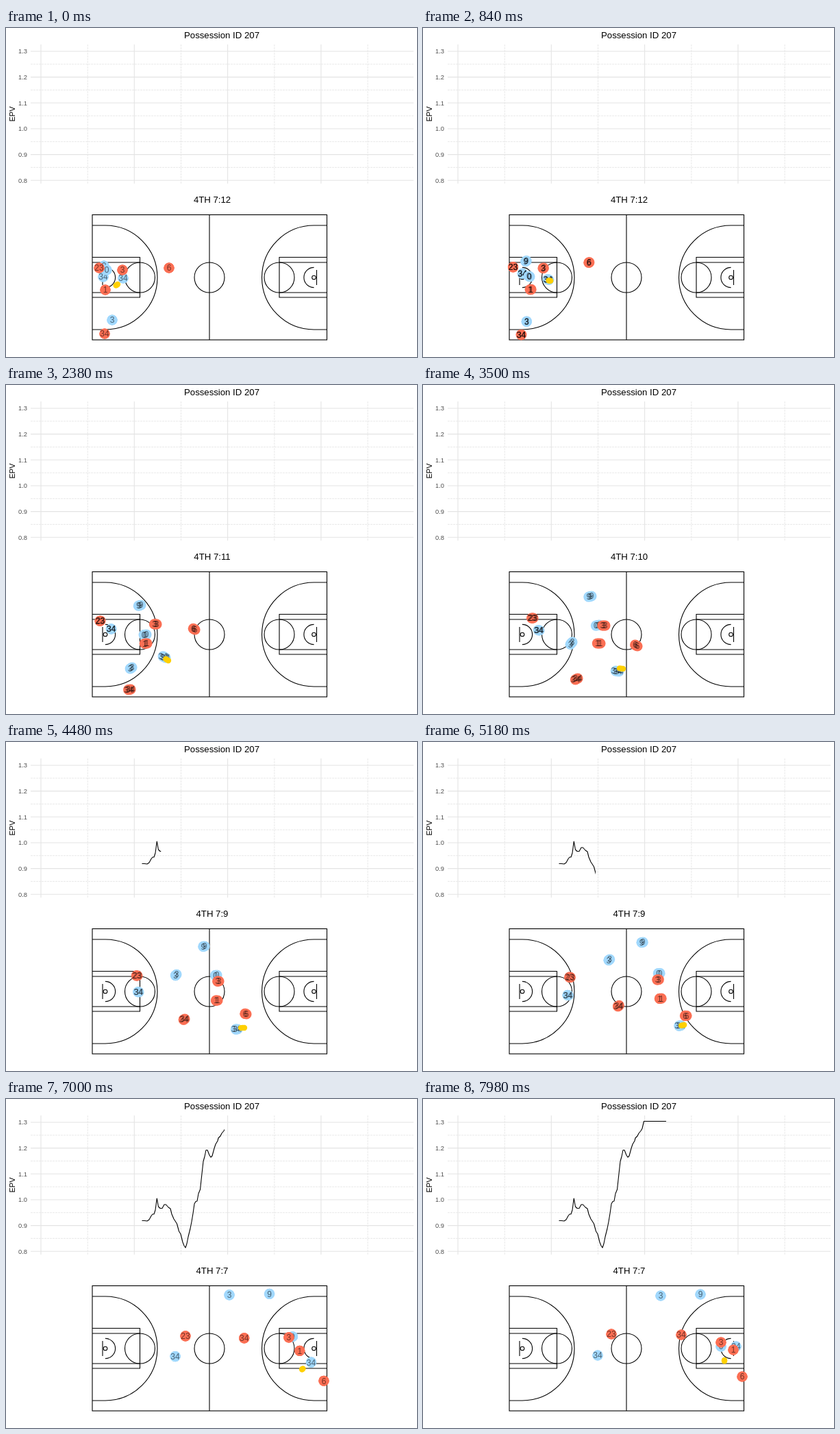
Write an HTML page that moves like this. It is 600 px wide and 480 px high and loops after 8 s.

```html
<!DOCTYPE html>
<html lang="en">
<head>
<meta charset="utf-8">
<title>Possession chart</title>
<style>
html, body { margin: 0; width: 600px; height: 480px; overflow: hidden; background: #fff; }
svg { position: absolute; left: 0; top: 0; }
text { font-family: "Liberation Sans", Arial, sans-serif; }
.title { font-size: 13.2px; text-anchor: middle; }
.tick { font-size: 9.3px; fill: #4d4d4d; text-anchor: end; }
.grid { stroke: #e4e4e4; stroke-width: 1.1; }
.minor { stroke: #e4e4e4; stroke-width: 0.8; stroke-dasharray: 3 1; }
.line { fill: none; stroke: #000; stroke-width: 1.1; }
.num { font-size: 12px; text-anchor: middle; fill: #000; fill-opacity: 0.55; }
</style>
</head>
<body>
<svg width="600" height="480" viewBox="0 0 600 480">
  <defs>
    <clipPath id="reveal"><rect id="window" width="0" height="240"/></clipPath>
    <g id="half" class="line">
      <path d="M126 334.5H195.5V393H126M126 342H195.5M126 386H195.5"/>
      <circle cx="195.5" cy="364" r="22"/>
      <circle cx="145" cy="364" r="2.8"/>
      <path d="M141 353V375M145 349.4A14.6 14.6 0 0 1 145 378.6"/>
      <path d="M126 288H145A76 76 0 0 1 145 440H126"/>
    </g>
  </defs>
  <g id="axes"></g>
  <text class="title" x="315" y="15">Possession ID 207</text>
  <text transform="translate(13 125.5) rotate(-90)" font-size="11" text-anchor="middle">EPV</text>
  <path class="line" clip-path="url(#reveal)" stroke-linejoin="round" d="M198.5 177.5L202 177.5 206 178 209 176 212 170.5 214 168 216 168 218 162 220.3 145 222.5 157 225 159.5 228 159.5 231 154 233.5 154 237 158 240 160 242 168 245 175 247 178 249.5 182 252.5 193 255 197 258 209 260 214 262 217 264 211 266 201 269 189 271 179 273 167 275 153 277 149.5 279 149 281 138 283.5 132 286 109 288 91 290 84 292 74.5 294 74.5 297 82 299 85 301 83 304 72 306 66 309 61 310 57 313 54 315 50 318 46.5 320 43 322.5 32.5H356"/>
  <text class="title" id="clock" x="301" y="255">4TH 7:12</text>
  <g class="line">
    <rect x="126" y="272.5" width="342.5" height="182.5"/>
    <path d="M297 272.5V455"/>
    <circle cx="297" cy="364" r="22"/>
  </g>
  <use href="#half"/>
  <use href="#half" transform="translate(594.5 0) scale(-1 1)"/>
  <g id="players"></g>
</svg>
<script>
const STEP = 140, LOOP = 8000, LAST = 57;
const RED = '#fb6f54', BLUE = '#a1d8fd', GOLD = '#ffd000';
const KEYS = [0, 1540, 2380, 3500, 4480, 6020, 7980];
const byId = id => document.getElementById(id);

function add(parent, tag, attrs, text) {
  const el = document.createElementNS('http://www.w3.org/2000/svg', tag);
  for (const name in attrs) el.setAttribute(name, attrs[name]);
  if (text) el.textContent = text;
  return parent.appendChild(el);
}

// Smooth curve through values at uneven times
function curve(times, values) {
  const n = times.length;
  const slope = i => (values[i + 1] - values[i]) / (times[i + 1] - times[i]);
  const m = values.map((_, i) => {
    if (i === 0 || i === n - 1) return 0;
    const a = times[i] - times[i - 1], b = times[i + 1] - times[i];
    return (slope(i - 1) * b + slope(i) * a) / (a + b);
  });
  m[0] = 2 * slope(0) - m[1];
  m[n - 1] = 2 * slope(n - 2) - m[n - 2];
  return t => {
    let i = 0;
    while (i < n - 2 && t >= times[i + 1]) i++;
    const h = times[i + 1] - times[i], u = (t - times[i]) / h, v = 1 - u;
    return v * v * ((1 + 2 * u) * values[i] + u * h * m[i]) +
      u * u * ((3 - 2 * u) * values[i + 1] - v * h * m[i + 1]);
  };
}

const movers = [];
function mover(label, color, xs, ys, times = KEYS) {
  const g = add(byId('players'), 'g', {});
  const make = (tag, attrs, text) => [0, 1, 2].map(() => add(g, tag, attrs, text));
  movers.push({
    x: curve(times, xs), y: curve(times, ys),
    discs: make('circle', { r: label ? 7.6 : 4.2, fill: color }),
    nums: label ? make('text', { class: 'num' }, label) : []
  });
}

mover('9', BLUE, [143, 167, 197, 246, 290, 355, 405], [347, 332, 321, 308, 298, 287, 285]);
mover('34', BLUE, [142, 149, 154, 170, 194, 232, 255], [363, 356, 356, 358, 365, 374, 374]);
mover('0', BLUE, [147, 173, 205, 257, 308, 387, 435], [353, 366, 364, 350, 340, 339, 361]);
mover('34', BLUE, [171, 202, 233, 286, 338, 417, 457], [365, 377, 398, 418, 419, 402, 361]);
mover('3', BLUE, [155, 160, 184, 218, 249, 300, 347], [426, 424, 412, 375, 339, 297, 287]);
mover('23', RED, [136, 132, 138, 161, 192, 241, 275], [350, 347, 344, 340, 341, 346, 343]);
mover('34', RED, [144, 155, 182, 226, 261, 316, 377], [446, 447, 444, 428, 404, 363, 344]);
mover('3', RED, [170, 191, 220, 266, 311, 381, 435], [353, 349, 349, 351, 349, 345, 355]);
mover('1', RED, [145, 176, 206, 259, 309, 392, 453], [382, 380, 377, 377, 377, 370, 366]);
mover('6', RED, [238, 254, 276, 313, 351, 427, 457, 466], [350, 344, 357, 381, 397, 401, 410, 405],
  [...KEYS.slice(0, 6), 6720, 7980]);
mover('', GOLD, [163, 208, 237, 292, 348, 412, 440], [374, 377, 402, 414, 417, 404, 381]);

const axes = byId('axes');
for (let i = 0; i < 6; i++) {
  const y = 34 + i * 37.65;
  if (i < 5) add(axes, 'path', { class: 'minor', d: `M36 ${y + 18.8}H595` });
  add(axes, 'path', { class: 'grid', d: `M36 ${y}H595` });
  add(axes, 'text', { class: 'tick', x: 31, y: y + 3.3 }, (1.3 - i / 10).toFixed(1));
}
for (let i = 0; i < 4; i++) {
  const x = 51 + i * 136.3;
  add(axes, 'path', { class: 'grid', d: `M${x} 24V227` });
  add(axes, 'path', { class: 'minor', d: `M${x + 68.2} 24V227` });
}

function draw(step) {
  const t = step * STEP;
  byId('window').setAttribute('width', 355 - (LAST - step) * 5.15);
  byId('clock').textContent = '4TH 7:' + (t < 1500 ? 12 : 11 - Math.floor((t - 1500) / 1310));
  const trail = step === 0 ? 1 : t < 4000 ? 3 : t < 7000 ? 2 : 1;
  for (const m of movers) {
    const copies = m.nums.length ? trail : 3;
    m.discs.forEach((disc, i) => {
      const s = t - Math.min(i, copies - 1) * STEP / 3;
      const x = m.x(s), y = m.y(s), num = m.nums[i];
      disc.setAttribute('cx', x);
      disc.setAttribute('cy', y);
      if (num) {
        num.setAttribute('x', x);
        num.setAttribute('y', y + 4.3);
        num.setAttribute('visibility', i < copies ? 'visible' : 'hidden');
      }
    });
  }
}

let shown = -1;
function tick() {
  const step = Math.floor((performance.now() % LOOP) / STEP);
  if (step !== shown) draw(shown = step);
  requestAnimationFrame(tick);
}
tick();
</script>
</body>
</html>
```
